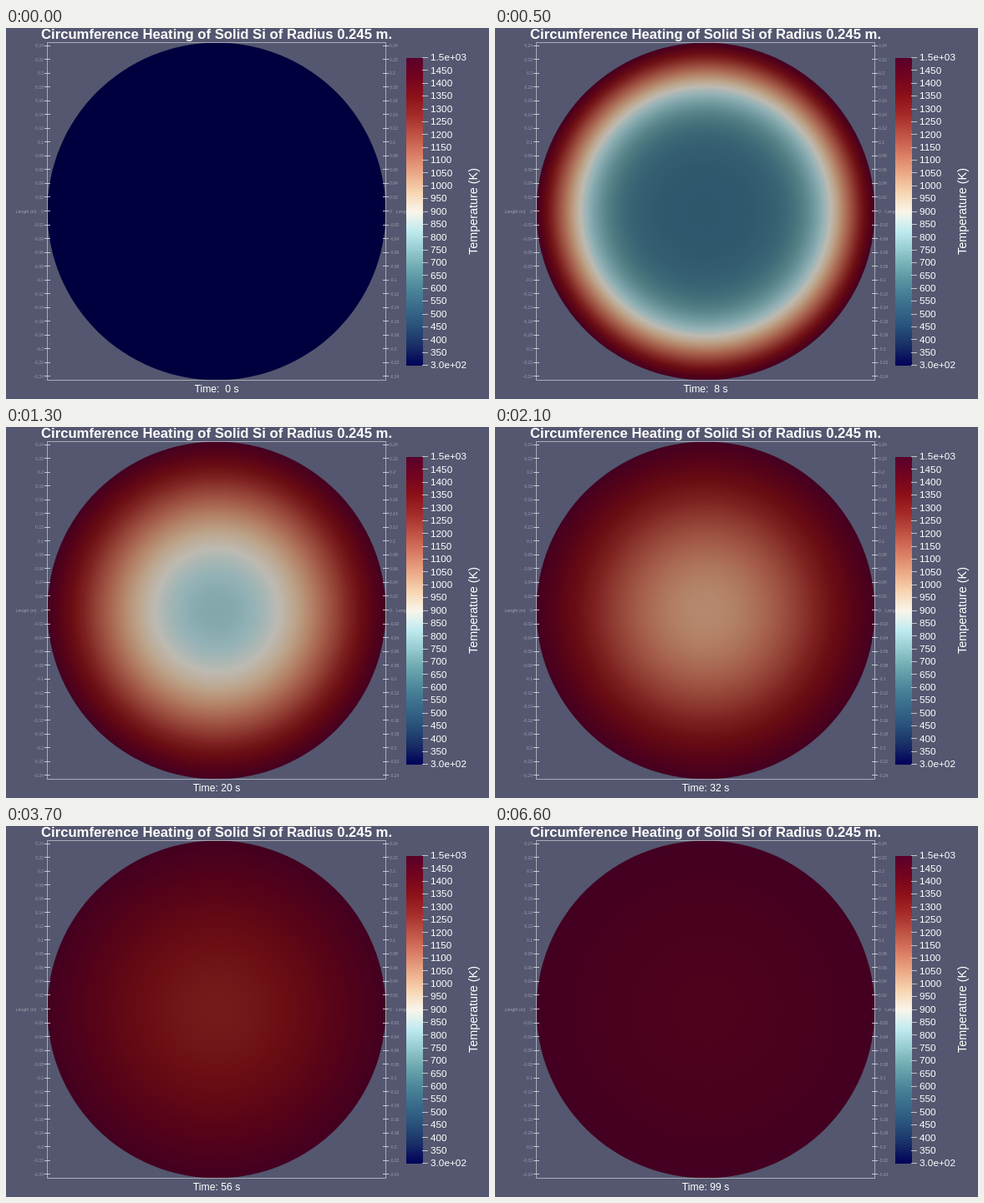
Recreate the animation shown at these times as an HTML page with a canvas. Size 578 px wide and 445 px high, loop 6.7 s.

```html
<!DOCTYPE html>
<html lang="en">
<head>
<meta charset="utf-8">
<title>Disk heating</title>
<style>
  html, body { margin: 0; width: 100%; height: 100%; overflow: hidden; background: rgb(84,87,111); }
  canvas { display: block; }
</style>
</head>
<body>
<canvas id="stage" width="578" height="445"></canvas>
<script>
const ctx = document.getElementById('stage').getContext('2d');
const SANS = '"Liberation Sans", Arial, sans-serif';
const BACK = 'rgb(84,87,111)';
const LOOP = 6700, STEP = 100;
const CX = 252, CY = 220, R = 202.5;
const T_MIN = 300, T_MAX = 1500;
const SHADE = 0.76;

// Cool-to-warm colour map, evenly spaced
const MAP = ('000059 182d66 285079 386a8a 4c869a 6ca6ae 94cad0 c0eaf0 f9f5ea ' +
  'f7d5b2 eba986 d97c63 bf5445 a52c2a 8c1119 73041f 59002b').split(' ')
  .map(h => [0, 2, 4].map(i => parseInt(h.slice(i, i + 2), 16)));

function heatColor(temp, shade = 1) {
  const p = Math.max(0, Math.min(1, (temp - T_MIN) / (T_MAX - T_MIN))) * (MAP.length - 1);
  const i = Math.min(MAP.length - 2, Math.floor(p));
  const c = MAP[i].map((v, k) => Math.round((v + (MAP[i + 1][k] - v) * (p - i)) * shade));
  return `rgb(${c})`;
}

function bessel(order, z) {
  const n = 64;
  let sum = 0;
  for (let i = 0; i < n; i++) {
    const a = (i + 0.5) * Math.PI / n;
    sum += Math.cos(order * a - z * Math.sin(a));
  }
  return sum / n;
}

// Radial modes of a disk whose rim is held at constant temperature
const RINGS = 80;
const modes = Array.from({ length: 14 }, (_, n) => {
  let z = (n + 0.75) * Math.PI;
  for (let i = 0; i < 5; i++) z += bessel(0, z) / bessel(1, z);
  const gain = 2 / (z * bessel(1, z));
  const shape = Array.from({ length: RINGS + 1 }, (_, i) => gain * bessel(0, z * i / RINGS));
  return { rate: (z / 2.4048) ** 2, shape };
});

function ringTemp(ring, sec) {
  const decay = 0.037 * sec * sec / (sec + 4);
  const amp = 0.7 + 0.3 * Math.exp(-sec / 7);
  const cold = modes.reduce((s, m) => s + m.shape[ring] * Math.exp(-decay * m.rate), 0);
  return T_MAX - (T_MAX - T_MIN) * amp * Math.max(0, Math.min(1, cold));
}

function text(str, x, y, size, align = 'left', color = '#fff', weight = 'normal') {
  ctx.font = `${weight} ${size}px ${SANS}`;
  ctx.textAlign = align;
  ctx.textBaseline = 'alphabetic';
  ctx.fillStyle = color;
  ctx.fillText(str, x, y);
}

function line(x1, y1, x2, y2) {
  ctx.beginPath();
  ctx.moveTo(x1, y1);
  ctx.lineTo(x2, y2);
  ctx.stroke();
}

function drawDisk(sec) {
  if (sec === 0) {
    ctx.fillStyle = heatColor(T_MIN, 0.7);
  } else {
    const grad = ctx.createRadialGradient(CX, CY, 0, CX, CY, R);
    for (let i = 0; i <= RINGS; i++) {
      grad.addColorStop(i / RINGS, heatColor(ringTemp(i, sec), SHADE));
    }
    ctx.fillStyle = grad;
  }
  ctx.beginPath();
  ctx.arc(CX, CY, R, 0, Math.PI * 2);
  ctx.fill();
}

function drawAxes() {
  const left = 49.5, right = 454.5, faint = 'rgb(158,160,176)';
  ctx.lineWidth = 1;
  ctx.strokeStyle = 'rgba(205,206,216,0.7)';
  ctx.strokeRect(left, 17.5, right - left, 405);
  ctx.strokeStyle = 'rgba(225,226,234,0.8)';
  for (let i = -12; i <= 12; i++) {
    const y = CY - i * 0.02 * R / 0.245;
    const label = String(i / 50);
    const ty = Math.round(y) - 0.5;
    line(left - 3.5, ty, left + 3.5, ty);
    line(right - 3.5, ty, right + 3.5, ty);
    text(label, 45, y + 1.5, 5, 'right', faint);
    text(label, 459, y + 1.5, 5, 'left', faint);
  }
  text('Length (m)', 11.5, 221.5, 5.2, 'left', faint);
  text('Length (m)', 467, 221.5, 5.2, 'left', faint);
}

function drawLegend() {
  const top = 36, bottom = 405, x = 479, w = 20;
  ctx.fillStyle = BACK;
  ctx.fillRect(x, top, 40, bottom - top);
  const grad = ctx.createLinearGradient(0, bottom, 0, top);
  for (let i = 0; i < MAP.length; i++) {
    const f = i / (MAP.length - 1);
    grad.addColorStop(f, heatColor(T_MIN + f * (T_MAX - T_MIN)));
  }
  ctx.fillStyle = grad;
  ctx.fillRect(x, top, w, bottom - top);
  ctx.strokeStyle = 'rgba(240,240,245,0.7)';
  for (let temp = T_MIN; temp <= T_MAX; temp += 50) {
    const y = bottom - (temp - T_MIN) / (T_MAX - T_MIN) * (bottom - top);
    const label = temp === T_MIN ? '3.0e+02' : temp === T_MAX ? '1.5e+03' : String(temp);
    const ty = Math.round(y) - 0.5;
    line(x + w - 1, ty, x + w + 6, ty);
    text(label, 508, y + 3.3, 11.8);
  }
  ctx.save();
  ctx.translate(564, 220);
  ctx.rotate(-Math.PI / 2);
  text('Temperature (K)', 0, 0, 14.4, 'center');
  ctx.restore();
}

function draw(ms) {
  const sec = Math.ceil(Math.floor(ms / STEP) * 1.5);
  ctx.fillStyle = BACK;
  ctx.fillRect(0, 0, 578, 445);
  drawDisk(sec);
  drawAxes();
  drawLegend();
  text('Circumference Heating of Solid Si of Radius 0.245 m.', 252, 13, 16.7, 'center', '#fff', 'bold');
  text(`Time: ${String(sec).padStart(2, ' ')} s`, 252, 437, 12.2, 'center');
}

const start = performance.now();
function tick() {
  draw((performance.now() - start) % LOOP);
  requestAnimationFrame(tick);
}
tick();
</script>
</body>
</html>
```
